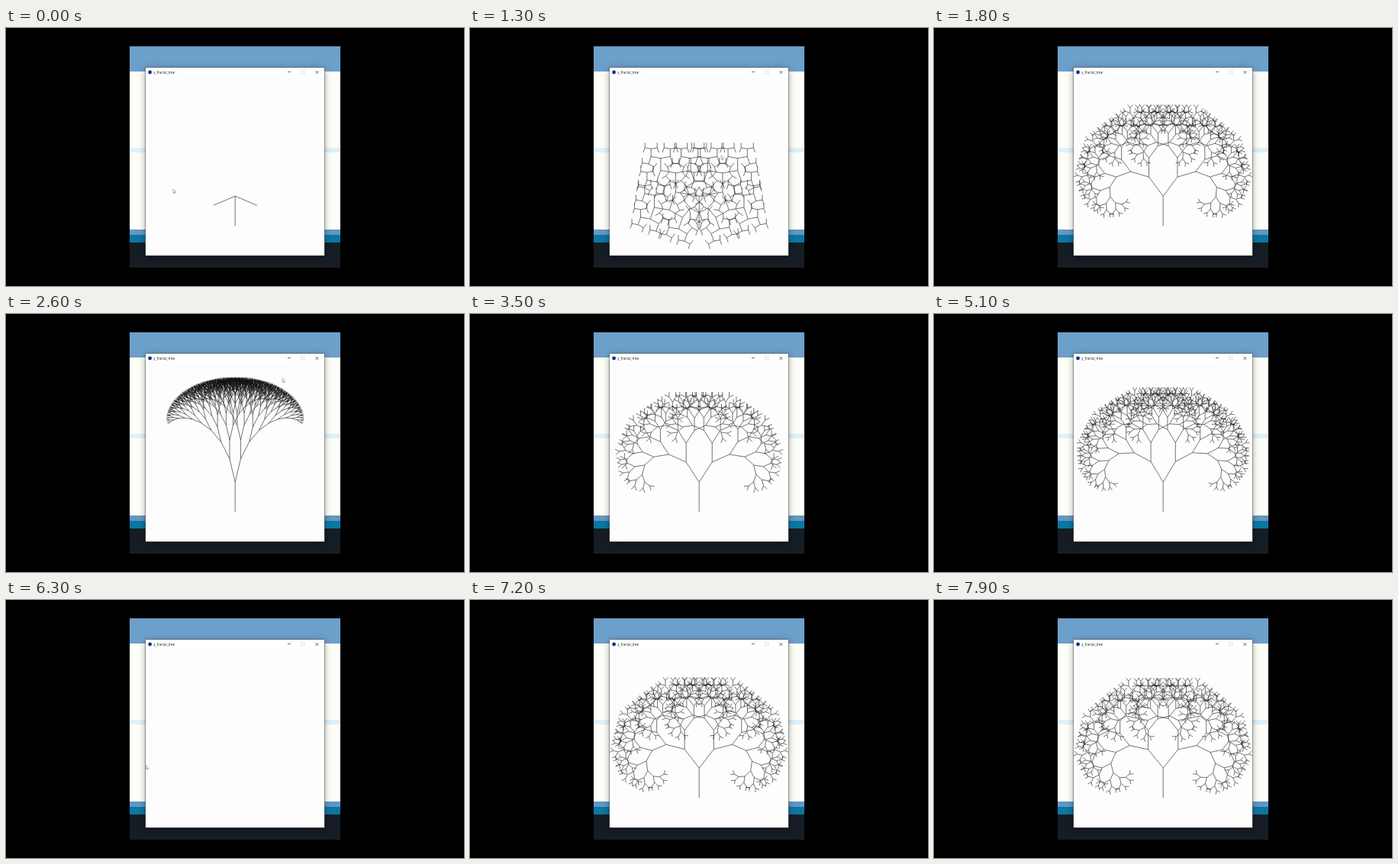
Write an HTML page with a canvas that moves like this. It is 600 px wide and 338 px high and loops after 8000 ms.

```html
<!DOCTYPE html>
<html lang="en">
<head>
<meta charset="utf-8">
<title>Fractal tree</title>
<style>
  html, body { margin: 0; width: 100%; height: 100%; overflow: hidden; background: #000; }
  canvas { display: block; }
</style>
</head>
<body>
<canvas id="stage" width="600" height="338"></canvas>
<script>
const ctx = document.getElementById('stage').getContext('2d');
const LOOP = 8000, STEP = 100;
const VIEW = { x: 183, y: 64, size: 234 };
const MAX_DEPTH = 15, TRUNK = 39, RATIO = 0.8;
const POINTER_LEAD = 40;

// Turning points of the pointer
const TURNS = [
  { t: 0, x: 219, y: 211 },
  { t: 1300, x: 329, y: 167 },
  { t: 2000, x: 366, y: 83 },
  { t: 2540, x: 365, y: 80 },
  { t: 3000, x: 343, y: 112.5 },
  { t: 3460, x: 330, y: 107 },
  { t: 5100, x: 346, y: 104.3 },
  { t: 6100, x: 176, y: 216 },
  { t: 6300, x: 183.5, y: 216.5 },
  { t: 7100, x: 340, y: 113 },
  { t: LOOP, x: 345, y: 114.8 }
];

const mix = (a, b, k) => a + (b - a) * k;

function pointerAt(time) {
  const t = Math.max(0, time);
  const next = Math.max(1, TURNS.findIndex(turn => turn.t >= t));
  const from = TURNS[next - 1], to = TURNS[next];
  const k = (t - from.t) / (to.t - from.t);
  return { x: mix(from.x, to.x, k), y: mix(from.y, to.y, k) };
}

function rect(color, x, y, w, h) {
  ctx.fillStyle = color;
  ctx.fillRect(x, y, w, h);
}

function line(x1, y1, x2, y2) {
  ctx.beginPath();
  ctx.moveTo(x1, y1);
  ctx.lineTo(x2, y2);
  ctx.stroke();
}

function clipped(x, y, w, h, draw) {
  ctx.save();
  ctx.beginPath();
  ctx.rect(x, y, w, h);
  ctx.clip();
  draw();
  ctx.restore();
}

function drawDesktop() {
  const band = (color, top, bottom) => rect(color, 162, top, 276, bottom - top);
  rect('#000', 0, 0, 600, 338);
  band('#fdfef8', 24, 314);
  band('#6c9fca', 24, 57);
  band('#def2fb', 157, 163);
  band('#6297c3', 264, 271);
  band('#0b77a3', 271, 281);
  band('#161d24', 281, 314);
}

function drawWindow() {
  clipped(162, 24, 276, 290, () => {
    ctx.shadowColor = 'rgba(0,0,0,.4)';
    ctx.shadowBlur = 9;
    ctx.shadowOffsetY = 2;
    rect('#fff', 183, 52, 234, 246);
  });
  rect('#fdfdfe', VIEW.x, VIEW.y, VIEW.size, VIEW.size);
  ctx.strokeStyle = '#555';
  ctx.lineWidth = 0.5;
  ctx.strokeRect(182.75, 51.75, 234.5, 246.5);
  drawTitleBar(58);
}

function drawTitleBar(mid) {
  ctx.fillStyle = '#1b2d9c';
  ctx.beginPath();
  ctx.arc(188.6, mid, 2.4, 0, Math.PI * 2);
  ctx.fill();
  ctx.fillStyle = '#222';
  ctx.font = '4.5px "Open Sans", sans-serif';
  ctx.fillText('y_fractal_tree', 193.2, mid + 1.7);

  const r = 2;
  ctx.lineWidth = 0.7;
  ctx.strokeStyle = '#333';
  line(371 - r, mid - 0.5, 371 + r, mid - 0.5);
  line(407.4 - r, mid - r, 407.4 + r, mid + r);
  line(407.4 + r, mid - r, 407.4 - r, mid + r);
  ctx.strokeStyle = '#d4d4d4';
  ctx.strokeRect(389 - r, mid - r, 2 * r, 2 * r);
}

function branch(x, y, length, heading, turn, depth) {
  if (depth <= 0) return;
  const endX = x + length * Math.sin(heading);
  const endY = y - length * Math.cos(heading);
  ctx.moveTo(x, y);
  ctx.lineTo(endX, endY);
  for (const side of [-1, 1]) {
    branch(endX, endY, length * RATIO, heading + side * turn, turn, depth - 1);
  }
}

// Horizontal position sets the depth, vertical position the branching angle.
function drawTree(mouse) {
  const depth = Math.floor((mouse.x - VIEW.x) / VIEW.size * MAX_DEPTH);
  const turn = (mouse.y - VIEW.y) / VIEW.size * Math.PI;
  clipped(VIEW.x, VIEW.y, VIEW.size, VIEW.size, () => {
    ctx.beginPath();
    branch(300.2, 259.2, TRUNK, 0, turn, depth);
    ctx.strokeStyle = '#111';
    ctx.lineWidth = 0.58;
    ctx.stroke();
  });
}

function drawPointer({ x, y }) {
  ctx.beginPath();
  ctx.moveTo(x, y);
  ctx.lineTo(x, y + 5.2);
  ctx.lineTo(x + 1.2, y + 4.2);
  ctx.lineTo(x + 2.3, y + 6);
  ctx.lineTo(x + 2, y + 3.9);
  ctx.lineTo(x + 3.6, y + 3.8);
  ctx.closePath();
  ctx.fillStyle = '#fff';
  ctx.fill();
  ctx.strokeStyle = '#666';
  ctx.lineWidth = 0.5;
  ctx.stroke();
}

function render(now) {
  const time = Math.floor((now % LOOP) / STEP) * STEP;
  drawDesktop();
  drawWindow();
  drawTree(pointerAt(time - POINTER_LEAD));
  drawPointer(pointerAt(time));
}

const start = performance.now();
function tick() {
  render(performance.now() - start);
  requestAnimationFrame(tick);
}
tick();
</script>
</body>
</html>
```
